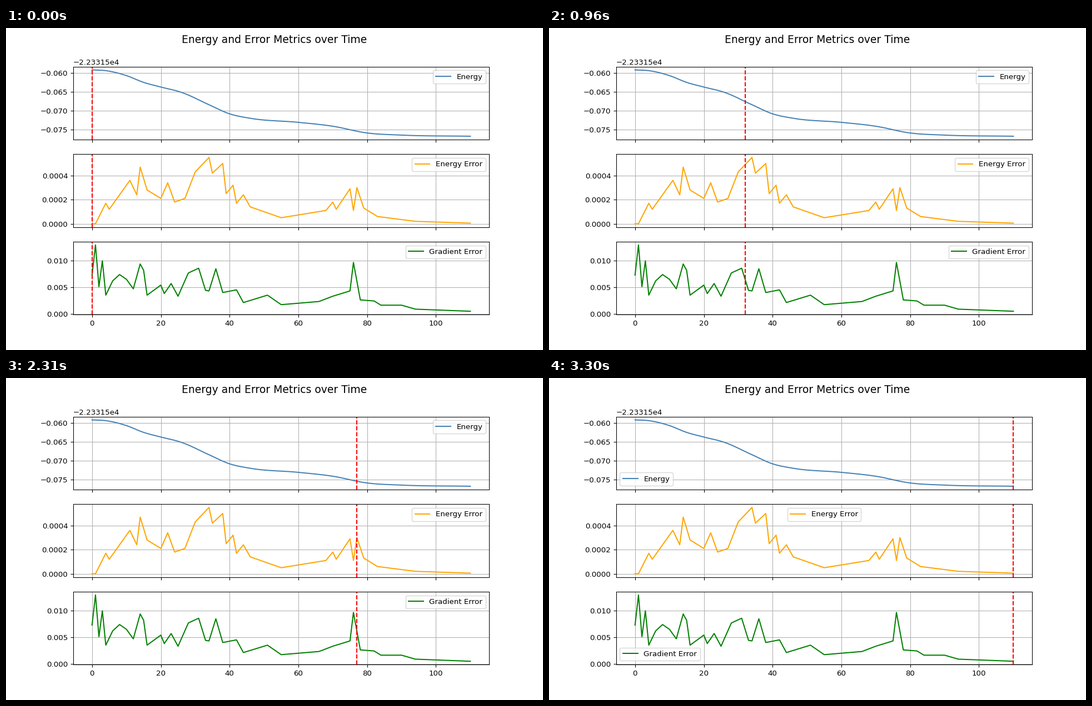
Write a matplotlib script that moves like this. It is 966 by 580 pixels and loops after 3.33 s.

```python
import numpy as np
import matplotlib.pyplot as plt
from matplotlib.animation import FuncAnimation

STEPS = 111
BASE = -22331.5

plt.rcParams["font.family"] = "DejaVu Sans"
steps = np.arange(STEPS)


def jagged(points):
    """Straight segments through (step, value) points."""
    x, y = np.transpose(points)
    return np.interp(steps, x, y)


def smooth(points):
    """Cubic Hermite curve through (step, value) points."""
    x, y = np.transpose(points)
    slope = np.gradient(y, x)
    k = np.clip(np.searchsorted(x, steps, side="right") - 1, 0, len(x) - 2)
    h = x[k + 1] - x[k]
    t = (steps - x[k]) / h
    ease = t * t * (3 - 2 * t)
    bend = t * (1 - t) * ((1 - t) * slope[k] - t * slope[k + 1])
    return y[k] + (y[k + 1] - y[k]) * ease + h * bend


energy = BASE - 1e-3 * smooth([
    (0, 59.26), (4, 59.45), (10, 60.76), (15, 62.56), (20, 63.79),
    (26, 65.2), (34, 68.48), (40, 70.9), (46, 72.07), (60, 73.15),
    (70, 74.18), (80, 75.97), (90, 76.53), (110, 76.83),
])

energy_error = 1e-5 * jagged([
    (1, 0), (4, 17), (5, 12), (9, 28), (11, 36), (13, 24), (14, 47),
    (16, 28), (20, 21), (22, 34), (24, 18), (27, 21), (30, 43), (34, 55),
    (35, 42), (38, 50), (39, 25), (41, 32), (42, 17), (44, 24), (46, 14),
    (55, 5), (68, 11), (70, 18), (71, 12), (75, 29), (76, 11), (77, 30),
    (79, 13), (83, 6), (94, 2), (110, 0.5),
])

gradient_error = 1e-3 * jagged([
    (0, 7.3), (1, 13), (2, 5.1), (3, 10), (4, 3.5), (6, 6.2), (8, 7.4),
    (10, 6.5), (12, 4.7), (14, 9.4), (15, 8.2), (16, 3.5), (20, 5.4),
    (21, 3.8), (23, 5.7), (25, 3.3), (28, 7.7), (31, 8.6), (33, 4.4),
    (34, 4.3), (36, 8.5), (38, 4), (42, 4.5), (44, 2.1), (51, 3.5),
    (55, 1.7), (66, 2.3), (70, 3.3), (75, 4.3), (76, 9.7), (78, 2.6),
    (82, 2.4), (84, 1.6), (90, 1.6), (94, 0.85), (110, 0.45),
])

# 966 x 580 pixels
fig, axes = plt.subplots(3, 1, sharex=True, figsize=(10, 6.0045), dpi=96.6)
fig.suptitle("Energy and Error Metrics over Time", fontsize=14)

series = [
    (energy, "Energy", "steelblue"),
    (energy_error, "Energy Error", "orange"),
    (gradient_error, "Gradient Error", "green"),
]
cursors = []
for ax, (values, label, color) in zip(axes, series):
    ax.plot(steps, values, color=color, label=label)
    ax.grid(True)
    cursors.append(ax.axvline(0, color="red", linestyle="--"))
    # "best" moves each legend aside once the cursor reaches it
    ax.legend(loc="best")


def update(step):
    for cursor in cursors:
        cursor.set_xdata([step, step])
    return cursors


anim = FuncAnimation(fig, update, frames=STEPS, interval=30, repeat=True)
plt.show()
```
